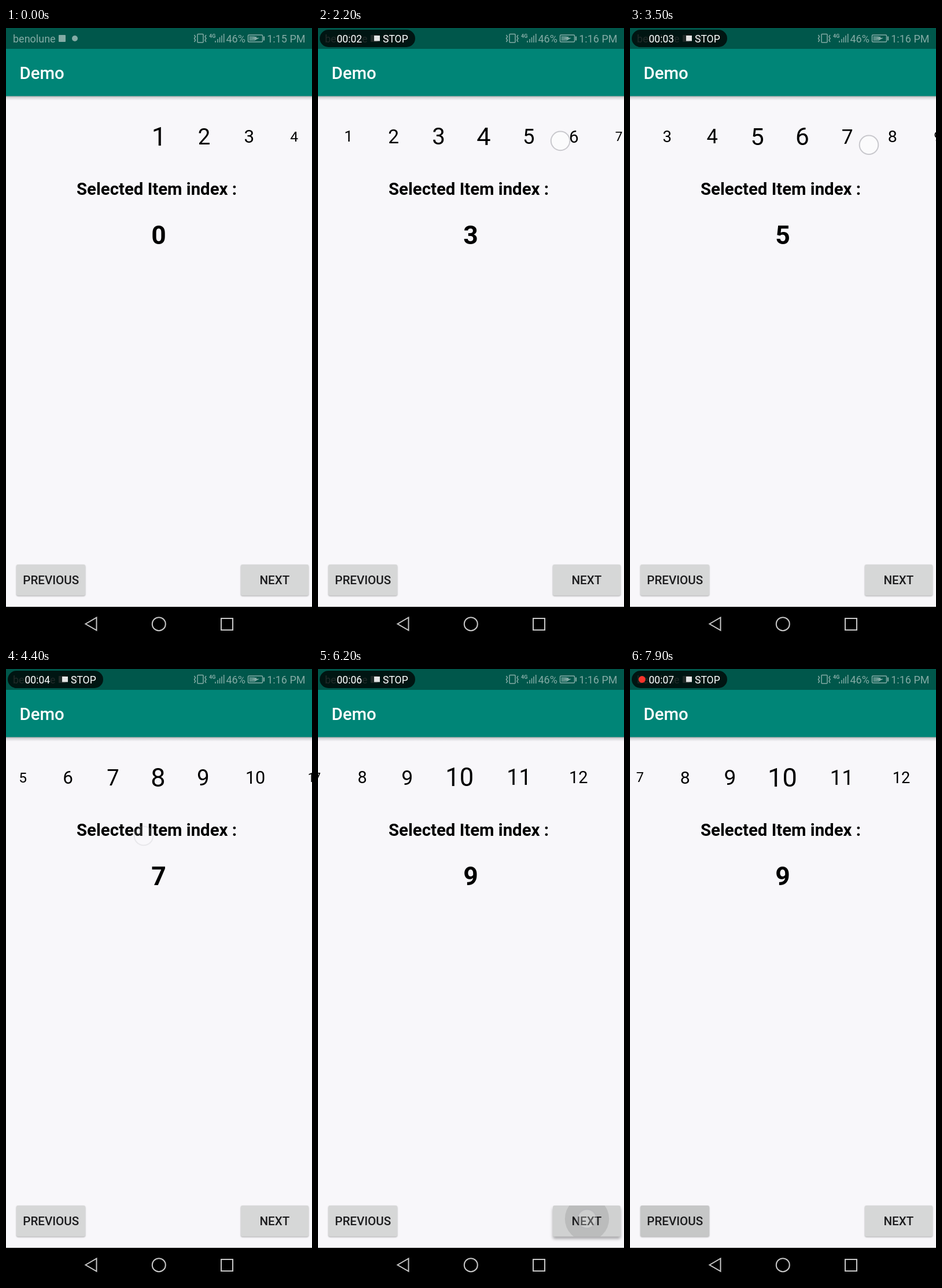
An HTML page that plays this animation: 529 px wide and 1058 px high, repeating every 8 s.

```html
<!DOCTYPE html>
<html lang="en">
<head>
<meta charset="utf-8">
<title>Demo</title>
<style>
  html, body { margin: 0; width: 100%; height: 100%; overflow: hidden; background: #f8f7fa; }
  svg { display: block; width: 100vw; height: 100vh; font-family: Roboto, sans-serif; }
  .mid { text-anchor: middle; }
  .bold { font-weight: 700; }
  .medium { font-weight: 500; }
  .status { font-size: 18px; fill: #84aba5; }
  .line { fill: none; stroke: #84aba5; stroke-width: 1.5; }
  .pill { font-size: 17.5px; fill: #fff; }
  .nav { fill: none; stroke: #c8c8c8; stroke-width: 2; }
  .button { fill: #d6d7d7; }
  .label { font-size: 20.6px; fill: #1b1b1d; }
</style>
</head>
<body>
<svg viewBox="0 0 529 1058">
  <defs>
    <linearGradient id="shade" x2="0" y2="1">
      <stop offset="0" stop-opacity=".36"/>
      <stop offset=".35" stop-opacity=".14"/>
      <stop offset="1" stop-opacity="0"/>
    </linearGradient>
    <clipPath id="clipPrevious"><rect x="18" y="926" width="119" height="53.5" rx="3"/></clipPath>
    <clipPath id="clipNext"><rect x="406" y="926" width="117" height="53.5" rx="3"/></clipPath>
  </defs>

  <rect width="529" height="1058" fill="#f8f7fa"/>
  <rect y="117" width="529" height="8" fill="url(#shade)"/>
  <rect y="35" width="529" height="82.5" fill="#008577"/>
  <rect width="529" height="36" fill="#00574b"/>
  <text class="medium" x="23.5" y="87.5" font-size="29.4" fill="#fff">Demo</text>

  <g class="status">
    <text x="12" y="24.5">benolune</text>
    <rect x="91" y="12" width="12" height="12" rx="1"/>
    <circle cx="119" cy="18" r="5"/>
    <rect class="line" x="331" y="10.5" width="10" height="14.5" rx="1"/>
    <path class="line" d="M325.500 12l2 3-2 3 2 3-2 3M346 12l-2 3 2 3-2 3 2 3"/>
    <text class="bold" x="351" y="16.500" font-size="9" style="font-size:9px">4G</text>
    <path class="line" stroke-width="2" d="M362 25v-3M366 25v-6M369.500 25v-9M373 25v-12M376.700 25v-15"/>
    <text x="380.500" y="24.500">46%</text>
    <rect class="line" x="418.500" y="12" width="25" height="12" rx="1.500"/>
    <rect x="420.500" y="14" width="10" height="8" opacity=".65"/>
    <path d="M425 18l8-3.500v2.500h5l-8 4.500v-3z"/>
    <rect x="445" y="14.500" width="2" height="7"/>
    <text id="clock" x="517.500" y="24.500" text-anchor="end"></text>
  </g>

  <g id="recorder" class="pill">
    <rect x="3" y="3" width="165" height="30" rx="15" fill="#000" opacity=".76"/>
    <circle id="dot" cx="20.800" cy="18" r="6" fill="#f5342b"/>
    <text id="timer" x="32.500" y="24.500"></text>
    <rect x="97" y="13" width="10" height="9.500" fill="#e4e4e4"/>
    <text x="112" y="24.500">STOP</text>
  </g>

  <g id="picker" class="mid"></g>
  <text class="bold" x="122" y="287.500" font-size="29.4">Selected Item index :</text>
  <text id="index" class="bold mid" x="264" y="373" font-size="44.500"></text>

  <rect id="previous" class="button" x="18" y="926" width="119" height="53.500" rx="3"/>
  <rect id="next" class="button" x="406" y="926" width="117" height="53.500" rx="3"/>
  <g id="ripples"></g>
  <text class="label medium mid" x="77.700" y="960">PREVIOUS</text>
  <text class="label medium mid" x="464.300" y="960">NEXT</text>

  <rect y="999" width="529" height="59"/>
  <path class="nav" d="M137.500 1028.500L156.500 1017.500V1039.500Z"/>
  <circle class="nav" cx="264.300" cy="1028.700" r="11.500"/>
  <rect class="nav" x="372" y="1019" width="20" height="20"/>

  <g id="touches"></g>
</svg>
<script>
const LOOP = 8000, CENTER = 264.5, ITEMS = 16;
const $ = id => document.getElementById(id);
const clamp = v => Math.max(0, Math.min(1, v));
const mix = (a, b, p) => a + (b - a) * p;
const easeOut = p => 1 - (1 - clamp(p)) ** 3;

function add(parent, tag, attributes) {
  const node = document.createElementNS("http://www.w3.org/2000/svg", tag);
  set(node, attributes);
  $(parent).append(node);
  return node;
}
function set(node, attributes) {
  for (const name in attributes) node.setAttribute(name, attributes[name]);
}

// Two-digit items are wider than one-digit items.
const itemWidth = n => n < 10 ? 77.9 : 102.8;
const offsets = [0];
for (let n = 2; n <= ITEMS; n++) {
  offsets.push(offsets[n - 2] + (itemWidth(n - 1) + itemWidth(n)) / 2);
}

// Swiped scroll distance as [ms, px], followed by the button taps.
const swipeKeys = [
  [0, 0], [1000, 0], [1600, 153.8], [1750, 155.8], [1950, 155.8],
  [2650, 312], [2720, 318], [2800, 315.6], [2950, 311.6], [3300, 311.6],
  [4300, 533], [4400, 547], [4600, 545.3], [LOOP, 545.3]
];
const taps = [
  [5100, 1], [5580, 1], [6050, 1], [6520, 1], [6950, -1], [7430, -1]
].map(([time, step]) => ({
  time, step,
  ripple: add("ripples", "circle", {
    cx: step > 0 ? 465 : 78, cy: 949,
    "clip-path": `url(#${step > 0 ? "clipNext" : "clipPrevious"})`
  })
}));

const touches = [
  { start: 1000, end: 1600, from: [479, 190], to: [325, 198] },
  { start: 1950, end: 2650, from: [475, 192], to: [319, 200] },
  { start: 3300, end: 4300, from: [457, 180], to: [238, 288] },
  ...taps.map(({ time, step }) => {
    const spot = [step > 0 ? 465 : 78, 949];
    return { start: time, end: time + 100, from: spot, to: spot };
  })
];
for (const touch of touches) {
  touch.node = add("touches", "circle", {
    r: 16.3, fill: "#fff", "fill-opacity": .4,
    stroke: "#b4b4ba", "stroke-opacity": .7, "stroke-width": 2
  });
}

const items = offsets.map((_, i) => {
  const node = add("picker", "text", {});
  node.textContent = i + 1;
  return node;
});

function scrollAt(t) {
  const k = swipeKeys.findIndex(key => key[0] > t);
  const [t0, s0] = swipeKeys[k - 1], [t1, s1] = swipeKeys[k];
  let scroll = mix(s0, s1, (t - t0) / (t1 - t0));
  let item = 7;
  for (const { time, step } of taps) {
    scroll += (offsets[item + step] - offsets[item]) * easeOut((t - time - 120) / 450);
    item += step;
  }
  return scroll;
}

function drawPicker(t) {
  const scroll = scrollAt(t);
  let nearest = 0;
  items.forEach((node, i) => {
    const shift = offsets[i] - scroll;
    const size = Math.max(15, 45.2 - .088 * Math.abs(shift));
    set(node, {
      x: CENTER + shift, y: 187 + size * .356, "font-size": size,
      visibility: Math.abs(shift) < 300 ? "visible" : "hidden"
    });
    if (Math.abs(shift) < Math.abs(offsets[nearest] - scroll)) nearest = i;
  });
  $("index").textContent = nearest;
}

function drawButtons(t) {
  const lift = { next: 0, previous: 0 };
  for (const { time, step, ripple } of taps) {
    const age = t - time;
    const name = step > 0 ? "next" : "previous";
    lift[name] = Math.max(lift[name], Math.min(clamp(age / 100), clamp((400 - age) / 150)));
    set(ripple, {
      r: age < 0 ? 0 : Math.min(105, 5 + age * .22),
      opacity: age < 0 ? 0 : .1 * clamp((700 - age) / 300)
    });
  }
  for (const name in lift) {
    const y = 1.5 + 3 * lift[name], blur = 1.3 + 1.5 * lift[name];
    $(name).style.filter = `drop-shadow(0 ${y}px ${blur}px rgba(0,0,0,.32))`;
  }
}

function drawTouches(t) {
  for (const { start, end, from, to, node } of touches) {
    const p = clamp((t - start) / (end - start));
    set(node, {
      cx: mix(from[0], to[0], p), cy: mix(from[1], to[1], p),
      opacity: t < start ? 0 : clamp(1 - (t - end) / 150)
    });
  }
}

function drawStatus(t) {
  const recorded = Math.max(0, t - 100);
  $("recorder").setAttribute("opacity", clamp(recorded / 200));
  $("timer").textContent = "00:0" + Math.floor(recorded / 1000);
  $("dot").setAttribute("opacity", recorded % 1000 >= 550 ? 1 : 0);
  $("clock").textContent = t < 2000 ? "1:15 PM" : "1:16 PM";
}

function frame(now) {
  const t = now % LOOP;
  drawStatus(t);
  drawPicker(t);
  drawButtons(t);
  drawTouches(t);
  requestAnimationFrame(frame);
}
frame(0);
</script>
</body>
</html>
```
